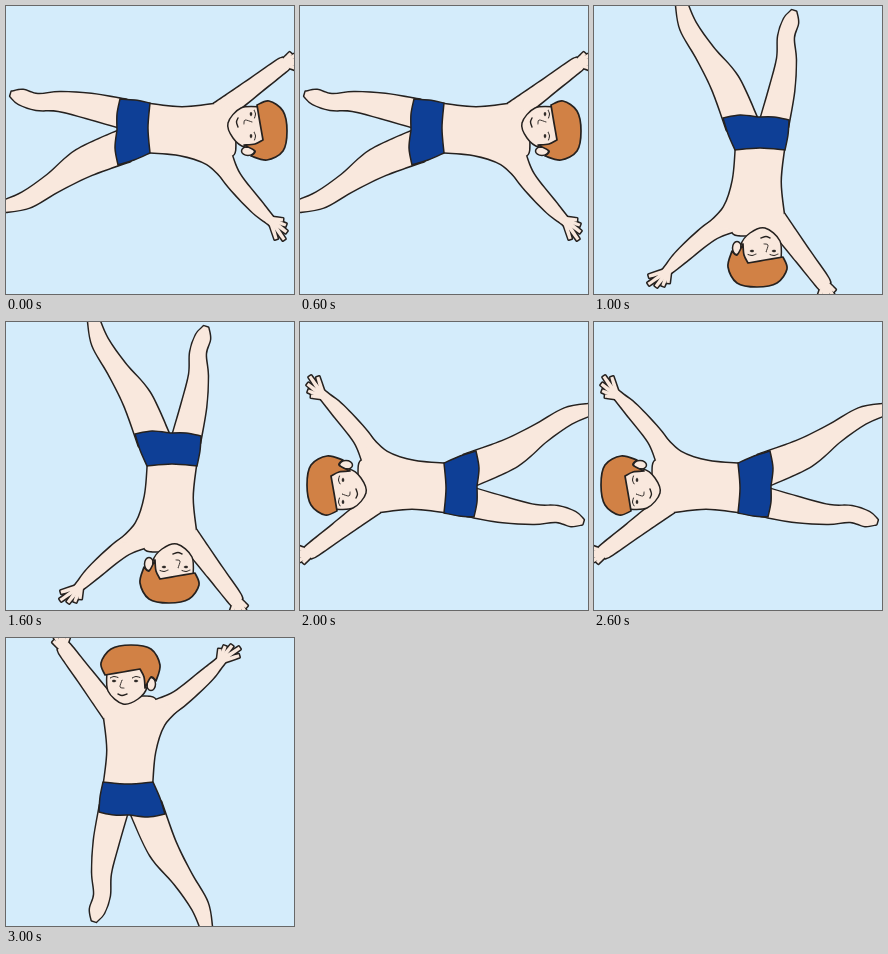
An HTML page with a canvas for the animation above (4000 ms loop, 288 by 288 pixels).

```html
<!DOCTYPE html>
<html lang="en">
<head>
<meta charset="utf-8">
<title>Turning swimmer</title>
<style>
html, body { margin: 0; width: 100%; height: 100%; overflow: hidden; background: #d4ecfb; }
canvas { display: block; width: 100vw; height: 100vh; }
</style>
</head>
<body>
<canvas id="stage"></canvas>
<script>
const SIZE = 288, HOLD = 1000, EDGE = 1.5;
const SKY = '#d4ecfb', SKIN = '#f9e8dd', BLUE = '#0e3f96', HAIR = '#d18145', INK = '#25211f';
const canvas = document.getElementById('stage');
const ctx = canvas.getContext('2d');

// Smooth curve through points; successive curves meet in a corner.
function curve(path, pts) {
  const at = i => pts[Math.max(0, Math.min(pts.length - 1, i))];
  path.lineTo(...pts[0]);
  for (let i = 0; i < pts.length - 1; i++) {
    const [a, b, c, d] = [at(i - 1), at(i), at(i + 1), at(i + 2)];
    path.bezierCurveTo(
      b[0] + (c[0] - a[0]) / 6, b[1] + (c[1] - a[1]) / 6,
      c[0] - (d[0] - b[0]) / 6, c[1] - (d[1] - b[1]) / 6, c[0], c[1]);
  }
}

function shape(...curves) {
  const path = new Path2D();
  curves.forEach(pts => curve(path, pts));
  path.closePath();
  return path;
}

// Tapered limb along a spine of [x, y, half width].
function limb(...spine) {
  const side = sign => spine.map(([x, y, w], i) => {
    const a = spine[Math.max(0, i - 1)], b = spine[Math.min(spine.length - 1, i + 1)];
    const dx = b[0] - a[0], dy = b[1] - a[1];
    const k = sign * (w - EDGE / 2) / Math.hypot(dx, dy);
    return [x - dy * k, y + dx * k];
  });
  return shape(side(1), side(-1).reverse());
}

// Five fingers fanned around an angle, the fourth one longest.
function hand(x, y, angle) {
  return Array.from({ length: 5 }, (_, i) => {
    const a = angle + (i - 2) * 0.3, len = 25 - 4 * Math.abs(i - 3);
    return limb([x, y, 3], [x + len * Math.cos(a), y + len * Math.sin(a), 2.3]);
  });
}

const flesh = [
  limb([108, 170, 15], [100, 205, 13], [95.5, 235, 10], [96, 257, 8.5], [91, 273, 8], [88, 283, 3]),
  limb([140, 170, 17], [157, 211, 15], [177, 241, 10.5], [194, 268, 9], [201, 292, 6]),
  limb([106, 74, 11], [79, 38, 9], [61, 14, 8], [57, 8, 7]),
  limb([152, 72, 11], [173, 61, 9], [200, 38, 7.5], [212, 26, 5.5], [217, 21, 4.5]),
  shape(
    [[98, 146], [101.5, 112], [98, 78]],
    [[105, 60], [144, 59], [150, 65]],
    [[176, 68], [158, 87], [149, 114], [146, 146]]),
  ...hand(57, 12, -1.8),
  ...hand(213, 24, -0.9)
];

const shorts = shape(
  [[97, 144], [122, 146], [147, 144]],
  [[147, 144], [154, 160], [159, 176]],
  [[159, 176], [142, 179], [124, 177]],
  [[124, 177], [108, 177], [93, 174]],
  [[93, 174], [94, 159], [97, 144]]);

const face = shape([[101, 32], [102, 53], [117, 66], [132, 61], [141, 49], [139, 28]]);

const hair = shape(
  [[99, 37], [95, 25], [105, 11], [125, 7], [145, 11], [154, 27], [150, 43]],
  [[150, 43], [145, 39], [139, 50]],
  [[139, 50], [138, 39], [134, 31]],
  [[134, 31], [117, 34], [99, 37]]);

function paint(path, fill, width = EDGE) {
  ctx.fillStyle = fill;
  ctx.fill(path);
  ctx.lineWidth = width;
  ctx.stroke(path);
}

function line(width, ...pts) {
  const path = new Path2D();
  curve(path, pts);
  ctx.lineWidth = width;
  ctx.stroke(path);
}

function oval(x, y, rx, ry) {
  const path = new Path2D();
  path.ellipse(x, y, rx, ry, 0, 0, 2 * Math.PI);
  return path;
}

function swimmer() {
  ctx.strokeStyle = INK;
  ctx.lineCap = ctx.lineJoin = 'round';

  // Ink first, then skin, so that the parts merge into one outline.
  ctx.lineWidth = 2 * EDGE;
  flesh.forEach(part => ctx.stroke(part));
  ctx.fillStyle = SKIN;
  flesh.forEach(part => ctx.fill(part));
  paint(shorts, BLUE);

  paint(oval(145, 46, 4.5, 6.5), SKIN);
  paint(face, SKIN);
  paint(hair, HAIR, 1.7);

  for (const x of [108, 130]) {
    line(1, [x - 4, 40], [x, 38.5], [x + 4, 39.5]);
    paint(oval(x, 43, 1.8, 1), INK, 0.5);
  }
  line(0.9, [116, 42], [114, 49], [118, 50]);
  line(1.4, [112, 56], [116, 57.5], [121, 56]);
}

function frame(now) {
  const ratio = devicePixelRatio || 1;
  const w = Math.round(innerWidth * ratio), h = Math.round(innerHeight * ratio);
  if (canvas.width !== w || canvas.height !== h) {
    canvas.width = w;
    canvas.height = h;
  }
  ctx.setTransform(w / SIZE, 0, 0, h / SIZE, 0, 0);
  ctx.fillStyle = SKY;
  ctx.fillRect(0, 0, SIZE, SIZE);

  // A hard quarter turn clockwise each second.
  const turn = (Math.floor(now / HOLD) + 1) % 4;
  ctx.translate(SIZE / 2, SIZE / 2);
  ctx.rotate(turn * Math.PI / 2);
  ctx.translate(-SIZE / 2, -SIZE / 2);
  swimmer();
  requestAnimationFrame(frame);
}

frame(performance.now());
</script>
</body>
</html>
```
